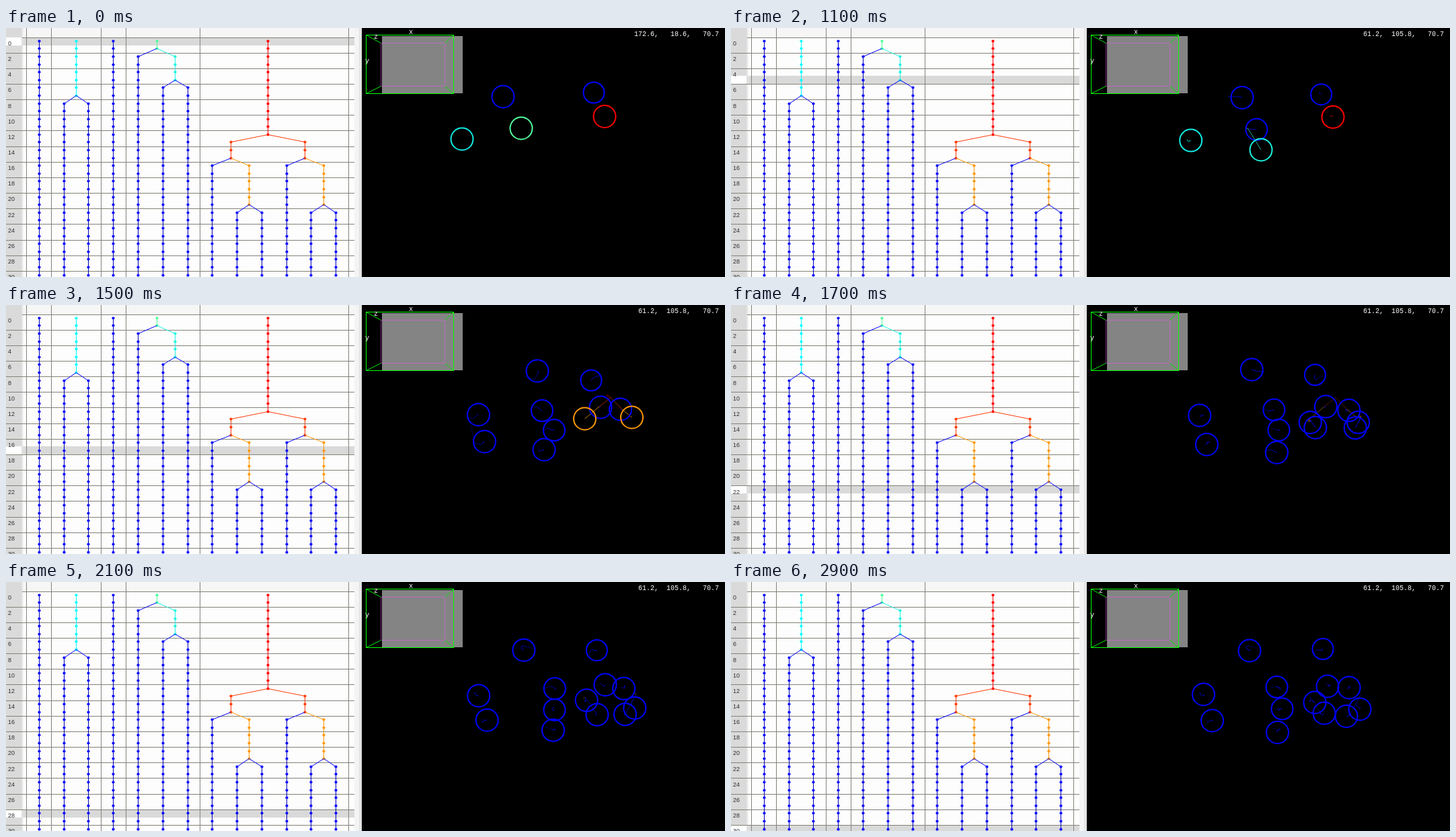
These frames come from a looping animation (1069x370 px, 3000 ms). An HTML page with a canvas:

```html
<!DOCTYPE html>
<html lang="en">
<head>
<meta charset="utf-8">
<title>Lineage tree and cell tracks</title>
<style>
html, body { margin: 0; width: 100%; height: 100%; overflow: hidden; background: #000; }
canvas { display: block; }
</style>
</head>
<body>
<canvas id="stage" width="1069" height="370"></canvas>
<script>
const ctx = document.getElementById('stage').getContext('2d');
const LOOP = 3000, LAST = 30, TAIL = 10, WANDER = 3;
const BLUE = '#0000ff', CYAN = '#00ffff', AQUA = '#1cf6e0', GREEN = '#52ff9c';
const RED = '#ff0000', EMBER = '#ff3c08', ORANGE = '#ff9808';
const GRID = '#83827a', MONO = '10px "Liberation Mono", "Courier New", monospace';

// the scroll reaches each key row at the matching time
const keyRows = [0, 10, 17, 26, LAST];
const keyTimes = [900, 1300, 1500, 1900, 2300];

// at: x, y pairs for the key rows a cell lives through, then for its last row
const cell = (color, at, end = LAST, kids = []) => ({ color, at, end, kids, r: 16.5 });
const leaf = (...at) => cell(BLUE, at);
const small = (c, r) => Object.assign(c, { r });

const roots = [
  leaf(739,102, 787,110, 790,98, 766,96, 771,102),
  cell(CYAN, [678,165, 688,167], 7, [
    leaf(694,169, 702.5,163, 697.5,167, 702.5,167),
    leaf(697,206, 711.5,203, 709,208, 715.5,206)]),
  small(leaf(874,96, 883,105.5, 870,112, 871,100, 880,99.5), 15.5),
  cell(GREEN, [766,149, 769,150], 1, [
    small(leaf(784,151, 797,157, 816.5,158, 811.5,156), 16),
    cell(AQUA, [788,181], 5, [
      small(leaf(798.5,187, 815,186, 811.5,189.5, 819.5,188.5), 16),
      leaf(792,215, 800,215, 816.5,218.5, 812.5,223.5)])]),
  cell(RED, [890,131.5, 894,135.5, 899,137.5], 12, [
    cell(EMBER, [882,151], 15, [
      leaf(884,152, 889,155, 887,155),
      cell(ORANGE, [860.5,169, 861.5,171], 21, [
        leaf(861,178, 868,179), leaf(876.5,194, 882,195)])]),
    cell(EMBER, [916,155], 15, [
      leaf(913.5,155, 919.5,154, 919,157),
      cell(ORANGE, [930.5,167, 936,168], 21, [
        leaf(929,181, 935,189), leaf(920,198, 915,199.5)])])])
];

const tracks = [], dividers = [];
const edge = n => 30.49 + 36.77 * n;
let leaves = 0;

// leaves take the next column, parents sit midway between their children
function layOut(t, parent) {
  t.parent = parent;
  t.start = parent ? parent.end + 1 : 0;
  t.id = tracks.push(t);
  const rows = [...keyRows.filter(k => k >= t.start && k < t.end), t.end];
  t.pts = rows.map((row, i) => [row, t.at[2 * i], t.at[2 * i + 1]]);
  if (parent) t.pts.unshift(parent.pts[parent.pts.length - 1]);
  t.kids.forEach(k => layOut(k, t));
  t.col = t.kids.length ? (t.kids[0].col + t.kids[1].col) / 2 : edge(leaves++) + 18.46;
}

for (const t of roots) {
  dividers.push(edge(leaves));
  layOut(t, null);
}
dividers.push(edge(leaves));

function rowAt(ms) {
  if (ms < keyTimes[0]) return 0;
  const i = keyTimes.findIndex(t => ms < t);
  if (i < 0) return LAST;
  const step = Math.floor(ms / 100) * 100;
  const k = (step - keyTimes[i - 1]) / (keyTimes[i] - keyTimes[i - 1]);
  return Math.round(keyRows[i - 1] + (keyRows[i] - keyRows[i - 1]) * k);
}

// daughters spring apart after a division, later stretches wander a little
function place(t, row) {
  const i = Math.max(1, t.pts.findIndex(p => row <= p[0]));
  const [r0, x0, y0] = t.pts[i - 1], [r1, x1, y1] = t.pts[i];
  const k = (row - r0) / (r1 - r0);
  const born = t.parent && i === 1;
  const e = born ? 1 - (1 - k) ** 3 : k;
  const sway = born ? 0 : WANDER * Math.sin(Math.PI * k);
  const seed = t.id * 12.9 + i * 78.2;
  return [x0 + (x1 - x0) * e + sway * Math.sin(seed + 3 * k),
          y0 + (y1 - y0) * e + sway * Math.cos(seed * 1.7 - 3 * k)];
}

const rowTop = r => Math.floor(14 + 11.58 * r);
const dotY = r => Math.floor(19.3 + 11.59 * r) + 0.5;

function box(x, y, w, h, color) {
  ctx.fillStyle = color;
  ctx.fillRect(x, y, w, h);
}

function line(x0, y0, x1, y1, color) {
  ctx.strokeStyle = color;
  ctx.beginPath();
  ctx.moveTo(x0, y0);
  ctx.lineTo(x1, y1);
  ctx.stroke();
}

function disc(x, y, rad) {
  ctx.beginPath();
  ctx.arc(x, y, rad, 0, Math.PI * 2);
}

function text(s, x, y, font, color, align = 'left') {
  ctx.font = font;
  ctx.fillStyle = color;
  ctx.textAlign = align;
  ctx.fillText(s, x, y);
}

function drawGrid(row) {
  box(0, 0, 529, 370, '#fdfdfd');
  box(24, 0, 494, 14, '#f6f6f6');
  box(24, rowTop(row), 494, 12, '#d9d9d9');
  box(0, 0, 23, 370, '#dadada');
  const fade = ctx.createLinearGradient(23, 0, 28, 0);
  fade.addColorStop(0, 'rgba(210,210,210,.8)');
  fade.addColorStop(1, 'rgba(255,255,255,0)');
  box(23, 0, 5, 370, fade);
  box(0, rowTop(row), 23, 12, '#ffffff');
  for (let i = 0; i <= LAST; i += 2) {
    box(i ? 0 : 24, rowTop(i), i ? 518 : 494, 1, GRID);
    text(i, 3, 26 + 11.57 * i, '9px "Liberation Sans", Arial, sans-serif', '#303030');
  }
  for (const x of dividers) box(Math.round(x), 0, 1, 370, GRID);
  box(518, 0, 7, 370, '#f4f4f4');
  box(525, 0, 4, 370, '#e4e4e4');
}

function drawTree() {
  const mid = t => Math.round(t.col) + 0.5;
  ctx.lineWidth = 1;
  for (const t of tracks) {
    const x = mid(t);
    if (t.parent) line(mid(t.parent), dotY(t.parent.end), x, dotY(t.start), t.color);
    line(x, dotY(t.start), x, dotY(t.end), t.color === BLUE ? '#0000b4' : t.color);
    ctx.fillStyle = t.color;
    for (let i = t.start; i <= t.end; i++) {
      disc(x, dotY(i), 2.1);
      ctx.fill();
    }
  }
}

function drawTail(t, row) {
  const from = Math.max(t.pts[0][0], row - TAIL);
  const to = Math.min(t.end, row);
  for (let i = from; i < to; i++) {
    ctx.globalAlpha = 0.85 - 0.6 * (row - i - 1) / TAIL;
    line(...place(t, i), ...place(t, i + 1), t.color);
  }
  ctx.globalAlpha = 1;
}

function drawCells(row) {
  ctx.lineWidth = 1;
  for (const t of tracks) drawTail(t, row);
  ctx.lineWidth = 2;
  for (const t of tracks) {
    if (row < t.start || row > t.end) continue;
    ctx.strokeStyle = t.color === CYAN ? '#10ece4' : t.color;
    disc(...place(t, row), t.r);
    ctx.stroke();
  }
}

function drawInset() {
  const outer = [535.5, 10.5, 665.5, 97.5], inner = [557.5, 22.5, 652.5, 86.5];
  const frame = ([l, t, r, b], color) => {
    ctx.strokeStyle = color;
    ctx.strokeRect(l, t, r - l, b - t);
  };
  ctx.lineWidth = 1;
  box(559, 12, 120, 85, '#848484');
  frame(inner, 'rgba(255,80,255,.5)');
  for (const i of [0, 2])
    for (const j of [1, 3]) line(outer[i], outer[j], inner[i], inner[j], '#00e800');
  frame(outer, '#00ff00');
  text('x', 599, 9, MONO, '#fff');
  text('y', 534, 52, MONO, '#fff');
  text('z', 547, 16, MONO, '#fff');
}

function drawCoords(ms) {
  const [x, y] = ms < 100 ? [172.6, 18.6] : ms < 200 ? [104.4, 71.2] : [61.2, 105.8];
  const pad = n => n.toFixed(1).padStart(7, '\u00a0');
  text(x.toFixed(1) + ',' + pad(y) + ',' + pad(70.7), 1060, 12, MONO, '#fff', 'right');
}

function draw(ms) {
  const row = rowAt(ms);
  drawGrid(row);
  drawTree();
  box(529, 0, 540, 370, '#000000');
  drawInset();
  drawCells(row);
  drawCoords(ms);
}

const began = performance.now();
function tick() {
  draw((performance.now() - began) % LOOP);
  requestAnimationFrame(tick);
}
tick();
</script>
</body>
</html>
```
